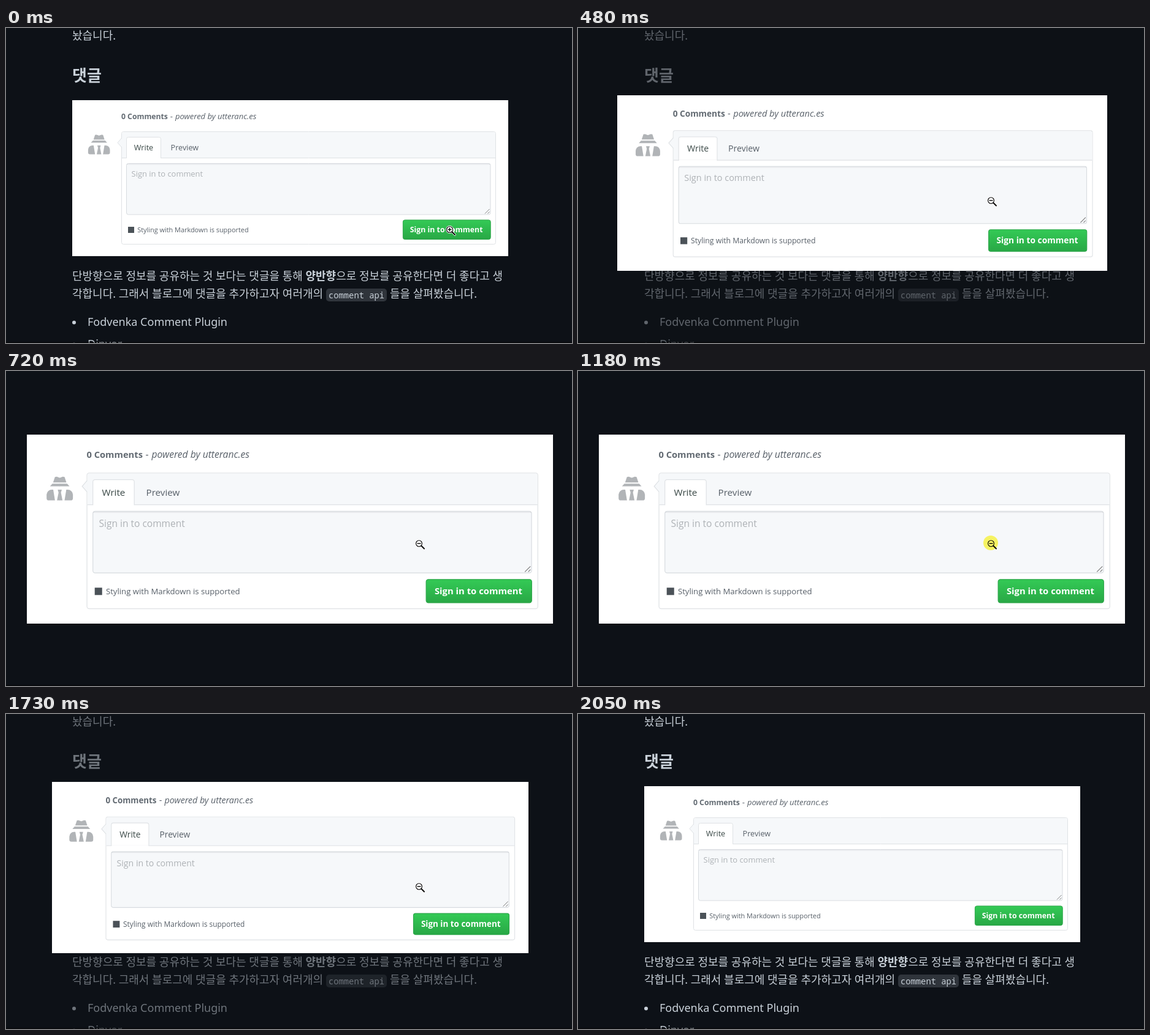
Recreate the animation shown at these times as an HTML page with a canvas. Size 923 px wide and 515 px high, loop 2.59 s.

```html
<!DOCTYPE html>
<html lang="ko">
<head>
<meta charset="utf-8">
<title>Image zoom</title>
<style>
html, body { margin: 0; width: 100%; height: 100%; overflow: hidden; background: #0d1117; }
canvas { display: block; width: 923px; height: 515px; }
</style>
</head>
<body>
<canvas id="stage" width="923" height="515"></canvas>
<script>
const W = 923, H = 515, LOOP = 2590, STEP = 80;
const ZOOM_IN = 383, ZOOM_OUT = 1640, FADE = 300;
const BG = '#0d1117', INK = '#c9d1d9', GREY = '#586069', EDGE = '#dfe2e5', SOFT = '#f6f8fa';
const PAGE = '"Noto Sans", "Noto Sans CJK KR", "Noto Sans CJK", sans-serif';
const CARD = '"Open Sans", "Noto Sans", sans-serif';
const MONO = '"Noto Sans Mono", "DejaVu Sans Mono", monospace';

// Card in the page, and its centre and scale when zoomed
const card = { x: 108, y: 118, w: 711, h: 255 };
const midX = card.x + card.w / 2, midY = card.y + card.h / 2;
const ZOOM_Y = 258.4, ZOOM = 857 / card.w;

const ctx = document.getElementById('stage').getContext('2d');
const clamp = v => Math.max(0, Math.min(1, v));
const mix = (a, b, p) => a + (b - a) * p;

function bezier(x1, y1, x2, y2) {
  const at = (a, b, s) => 3 * (1 - s) * (1 - s) * s * a + 3 * (1 - s) * s * s * b + s * s * s;
  return x => {
    let lo = 0, hi = 1;
    for (let i = 0; i < 30; i++) {
      const mid = (lo + hi) / 2;
      if (at(x1, x2, mid) < x) lo = mid; else hi = mid;
    }
    return at(y1, y2, (lo + hi) / 2);
  };
}
const zoomEase = bezier(0.2, 0, 0.2, 1);
const fadeEase = bezier(0.25, 0.1, 0.25, 1);

// 0 in the page, 1 fully zoomed
function progress(t, ease) {
  return ease(clamp((t - ZOOM_IN) / FADE)) - ease(clamp((t - ZOOM_OUT) / FADE));
}

// The screen refreshes in even steps, counted anew from the second click.
function refresh(t) {
  const from = t < 1180 ? 0 : 1650;
  return from + Math.floor((t - from) / STEP) * STEP;
}

function text(str, x, y, font, color) {
  ctx.font = font;
  ctx.fillStyle = color;
  ctx.fillText(str, x, y);
}

function box(x, y, w, h, r, fill, stroke) {
  ctx.beginPath();
  ctx.roundRect(x, y, w, h, r);
  ctx.fillStyle = fill;
  ctx.fill();
  if (!stroke) return;
  ctx.strokeStyle = stroke;
  ctx.lineWidth = 1;
  ctx.stroke();
}

function trace(pts) {
  ctx.beginPath();
  for (let i = 0; i < pts.length; i += 2) ctx.lineTo(pts[i], pts[i + 1]);
}

function poly(fill, ...pts) {
  trace(pts);
  ctx.fillStyle = fill;
  ctx.fill();
}

function line(color, width, ...pts) {
  trace(pts);
  ctx.strokeStyle = color;
  ctx.lineWidth = width;
  ctx.stroke();
}

function dot(x, y, r, fill) {
  ctx.beginPath();
  ctx.arc(x, y, r, 0, 7);
  ctx.fillStyle = fill;
  ctx.fill();
}

function drawPage() {
  const body = '18px ' + PAGE;
  text('놨습니다.', 108, 19, body, INK);
  text('댓글', 108, 87, 'bold 26px ' + PAGE, INK);
  text('단방향으로 정보를 공유하는 것 보다는 댓글을 통해', 108, 412, body, INK);
  text('양반향', 488.5, 412, 'bold 18px ' + PAGE, INK);
  text('으로 정보를 공유한다면 더 좋다고 생', 538.2, 412, body, INK);
  text('각합니다. 그래서 블로그에 댓글을 추가하고자 여러개의', 108, 441, body, INK);
  box(522, 426, 99, 21, 5, '#2f343b');
  text('comment api', 526, 442, '500 13.8px ' + MONO, INK);
  text('들을 살펴봤습니다.', 626, 441, body, INK);
  ['Fodvenka Comment Plugin', 'Dinvor'].forEach((item, i) => {
    dot(111, 481.5 + i * 36, 3, INK);
    text(item, 133, 487 + i * 36, body, INK);
  });
}

// One half, mirrored about the middle
function drawSpy() {
  const fill = '#b1b4b7';
  for (const side of [-1, 1]) {
    ctx.save();
    ctx.translate(151.7, 174);
    ctx.scale(side, 1);
    poly(fill, -0.2, 2, 4, 0.4, 6.5, 0.8, 9, 8.4, -0.2, 8.4);
    poly(fill, -0.2, 10, 10, 10, 13.2, 13.6, -0.2, 13.6);
    box(-0.2, 18, 18, 14.6, [0, 7, 3, 0], fill);
    poly('#fff', 3, 17, 9, 17, 6.4, 33, 3.8, 33, 1.6, 22);
    ctx.restore();
  }
}

function drawCard() {
  text('0 Comments', 188, 149.2, 'bold 12.2px ' + CARD, '#626a72');
  text('-', 267.8, 149.2, '13px ' + CARD, GREY);
  text('powered by utteranc.es', 276, 149.2, 'italic 13px ' + CARD, GREY);
  drawSpy();

  box(188.5, 169.5, 610, 184, 3, '#fff', EDGE);
  box(189, 170, 609, 42.5, [2.5, 2.5, 0, 0], SOFT);
  line(EDGE, 1, 189, 212.5, 798, 212.5);
  poly(SOFT, 189.2, 180, 182, 187.5, 189.2, 195);
  line(EDGE, 1, 188.5, 180, 182, 187.5, 188.5, 195);

  box(196.5, 178.5, 56, 34, [3, 3, 0, 0], '#fff', EDGE);
  line('#fff', 2, 197, 213, 252, 213);
  text('Write', 208.8, 200.2, '12.6px ' + CARD, '#3c4a48');
  text('Preview', 268.6, 200.2, '12.6px ' + CARD, GREY);

  box(196.5, 221.5, 593.5, 83.5, 3, SOFT, '#d8dce0');
  box(197, 222, 592.5, 1.5, 0, 'rgba(27,31,35,.06)');
  text('Sign in to comment', 204.6, 243, '12.9px ' + CARD, '#aeb2b6');
  for (const size of [7.5, 3]) line('#777', 0.9, 788.5 - size, 303.5, 788.5, 303.5 - size);

  box(199, 325, 10, 10, 0, '#4b5258');
  text('Styling with Markdown is supported', 214.2, 334, '10.9px ' + CARD, GREY);

  const green = ctx.createLinearGradient(0, 313, 0, 346);
  green.addColorStop(0, '#34cb56');
  green.addColorStop(1, '#28a745');
  box(647.4, 313.9, 142.8, 31.6, 3, green, '#2ca549');
  text('Sign in to comment', 658.8, 334, 'bold 12.3px ' + CARD, '#fff');
}

function drawZoomed(p) {
  const y = mix(midY, ZOOM_Y, p), scale = mix(1, ZOOM, p);
  const left = Math.floor(midX - card.w / 2 * scale), right = Math.ceil(midX + card.w / 2 * scale);
  const top = Math.floor(y - card.h / 2 * scale), bottom = Math.ceil(y + card.h / 2 * scale);
  box(left, top, right - left, bottom - top, 0, '#fff');
  ctx.save();
  ctx.translate(midX, y);
  ctx.scale(scale, scale);
  ctx.translate(-midX, -midY);
  drawCard();
  ctx.restore();
}

function drawCursor(x, y, plus) {
  ctx.lineCap = 'round';
  line('#fff', 3.6, x + 4, y + 4, x + 8.5, y + 8.5);
  dot(x, y, 6.4, '#fff');
  line('#000', 1.9, x + 4, y + 4, x + 8.5, y + 8.5);
  ctx.lineCap = 'butt';
  dot(x, y, 5.5, '#000');
  dot(x, y, 4.4, '#fff');
  line('#000', 1.4, x - 3, y, x + 3, y);
  if (plus) line('#000', 1.4, x, y - 3, x, y + 3);
}

function drawPointer(t, tick) {
  if (tick >= 2050) return;
  const p = clamp(tick / (2 * STEP));
  drawCursor(mix(723.5, 673.5, p), mix(329.5, 282, p), tick < 400);
  const pressed = (t >= 330 && t < 400) || (t >= 1180 && t < 1650);
  if (!pressed) return;
  ctx.globalCompositeOperation = 'multiply';
  dot(673, 281, 12, '#fffa64');
  ctx.globalCompositeOperation = 'source-over';
}

function draw(t) {
  const tick = refresh(t);
  box(0, 0, W, H, 0, BG);
  drawPage();
  ctx.globalAlpha = progress(tick, fadeEase);
  box(0, 0, W, H, 0, BG);
  ctx.globalAlpha = 1;
  drawZoomed(progress(tick, zoomEase));
  drawPointer(t, tick);
  box(0, 513, W, 2, 0, 'rgba(0,0,0,.4)');
}

const start = performance.now();
function frame() {
  draw(Math.max(0, performance.now() - start) % LOOP);
  requestAnimationFrame(frame);
}
frame();
</script>
</body>
</html>
```
